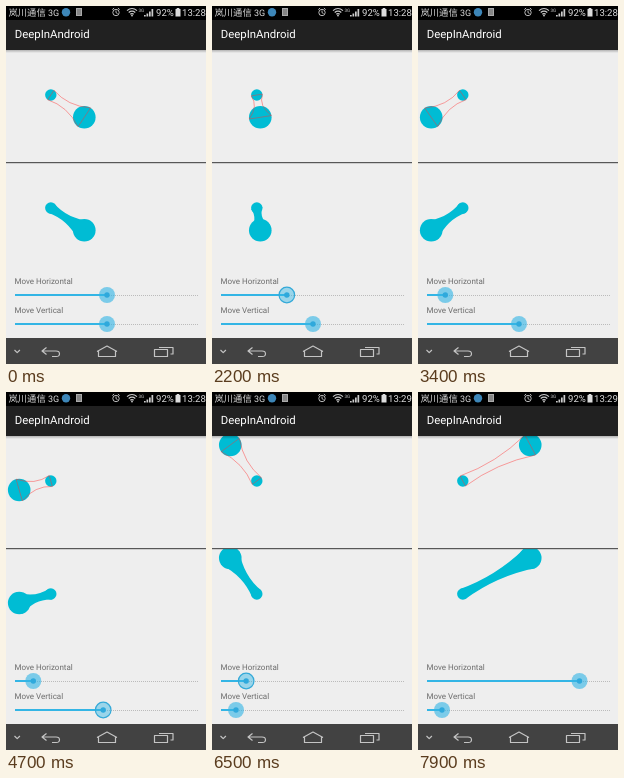
Animation of 200x358 px, one loop 8000 ms. Source, as an HTML page:

```html
<!DOCTYPE html>
<html lang="en">
<head>
<meta charset="utf-8">
<title>Bezier metaball</title>
<style>
html, body { margin: 0; width: 100%; height: 100%; overflow: hidden; background: #eee; }
svg { display: block; width: 100vw; height: 100vh; }
text { font-family: Roboto, "Noto Sans CJK SC", "Noto Sans CJK", sans-serif; text-rendering: geometricPrecision; }
.label { font-size: 8px; fill: #6c6c6c; }
.status { font-size: 9.6px; fill: #dcdcdc; }
.nav { fill: none; stroke: #c4c4c4; stroke-width: 1.2; stroke-linejoin: round; }
</style>
</head>
<body>
<svg viewBox="0 0 200 358">
  <defs>
    <clipPath id="upper"><rect y="44" width="200" height="112"/></clipPath>
    <clipPath id="lower"><rect y="157" width="200" height="112"/></clipPath>
    <linearGradient id="shade" x2="0" y2="1">
      <stop stop-color="#000" stop-opacity=".25"/>
      <stop offset="1" stop-color="#000" stop-opacity="0"/>
    </linearGradient>
  </defs>
  <rect width="200" height="358" fill="#eee"/>

  <g clip-path="url(#upper)">
    <g fill="#00bcd4">
      <circle cx="44.8" cy="89" r="5.7"/>
      <circle class="ball" r="11.3"/>
    </g>
    <path class="neck" fill="none" stroke="#f33" stroke-width=".7" stroke-opacity=".65"/>
  </g>
  <g clip-path="url(#lower)">
    <g transform="translate(0 113)" fill="#00bcd4">
      <circle cx="44.8" cy="89" r="5.7"/>
      <circle class="ball" r="11.3"/>
      <path class="neck"/>
    </g>
  </g>
  <rect y="156.1" width="200" height="1.1" fill="#484848"/>

  <text class="label" x="8.5" y="278">Move Horizontal</text>
  <text class="label" x="8.5" y="306.5">Move Vertical</text>
  <g id="sliders"></g>

  <rect y="14" width="200" height="30" fill="#212121"/>
  <rect y="44" width="200" height="3" fill="url(#shade)"/>
  <text x="8.7" y="32.3" font-size="11.4" fill="#fff">DeepInAndroid</text>

  <rect width="200" height="14" fill="#000"/>
  <text class="status" x="2.5" y="9.6" style="font-size: 9.3px">岚川通信</text>
  <text class="status" x="42" y="9.6" style="font-size: 9px">3G</text>
  <circle cx="60" cy="6.3" r="4.2" fill="#3d86b8"/>
  <path d="M70 2h6v8h-6z" fill="#aaa"/>
  <path d="M71 4h4M71 6h4M71 8h4" stroke="#444" stroke-width=".7"/>
  <g fill="none" stroke="#ccc" stroke-width=".9">
    <circle cx="110" cy="6.5" r="3.2"/>
    <path d="M110 4.5v2.2l1.5 .8M106.3 3.6l1.8-1.6M113.7 3.6l-1.8-1.6"/>
    <path d="M121 4.6q5-4.2 10 0M122.7 6.5q3.3-2.6 6.6 0M124.3 8.3q1.7-1.3 3.4 0" stroke-width="1.2"/>
  </g>
  <circle cx="126" cy="9.6" r=".9" fill="#ccc"/>
  <text x="132.5" y="5.5" font-size="4.6" fill="#ccc">3G</text>
  <path d="M138 10.5V9h1.700v1.500zM140.500 10.500V7.500h1.700v3zM143 10.500V5.500h1.700v5zM145.500 10.500V3h1.700v7.500z" fill="#ccc"/>
  <text class="status" x="150" y="9.600">92%</text>
  <path d="M169.500 3h1.200V2h2.600v1h1.200v7.500h-5z" fill="#ddd"/>
  <text class="status" id="clock" x="176" y="9.600"></text>

  <rect y="332" width="200" height="26" fill="#424242"/>
  <g class="nav">
    <path d="M8.500 344l2.700 2.700 2.700-2.700"/>
    <path d="M40.500 341.500l-4.500 3.500 4.500 3.500M36 345H50q3.500 0 3.500 2.800T50 350.500h-4"/>
    <path d="M91 345.500l10-5.500 10 5.500M92.500 345v5.500h17V345"/>
    <path d="M148.500 343.500h13v7h-13zM153 341.500h14v6.500h-2.500"/>
  </g>
</svg>
<script>
const LOOP = 8000, STEP = 100;
const LEFT = 9, RIGHT = 193;
const small = { x: 44.8, y: 89, r: 5.7 };
const BIG_R = 11.3;

// Thumb positions as [ms, x]
const hKeys = [[0, 101], [1600, 101], [1700, 102.3], [1900, 94], [2600, 49.3], [2800, 32], [2900, 27.3],
  [6400, 27.3], [6600, 41], [7100, 99], [7700, 158], [7800, 161.5]];
const vKeys = [[0, 101], [4500, 101], [4700, 97.2], [4900, 84], [5400, 33], [5600, 26], [5900, 24]];
const hHeld = t => (t >= 1700 && t < 3100) || (t >= 6400 && t < 7900);
const vHeld = t => t >= 4400 && t < 5900;

function at(keys, t) {
  const i = keys.findIndex(k => k[0] > t);
  if (i < 0) return keys[keys.length - 1][1];
  const [t0, a] = keys[i - 1], [t1, b] = keys[i];
  return a + (b - a) * (t - t0) / (t1 - t0);
}

function set(el, attrs) {
  for (const k in attrs) el.setAttribute(k, attrs[k]);
}

function make(name, attrs, parent) {
  const el = document.createElementNS("http://www.w3.org/2000/svg", name);
  set(el, attrs);
  return parent.appendChild(el);
}

function slider(y) {
  const g = make("g", {}, document.getElementById("sliders"));
  make("path", { d: `M${LEFT} ${y + .5}H${RIGHT}`, stroke: "#bbb", "stroke-width": 1, "stroke-dasharray": "1 1" }, g);
  const fill = make("path", { stroke: "#33b5e5", "stroke-width": 2 }, g);
  const halo = make("circle", { cy: y, fill: "#33b5e5" }, g);
  const dot = make("circle", { cy: y, r: 2.7, fill: "#2fa9dc" }, g);
  return (x, held) => {
    set(fill, { d: `M${LEFT} ${y}H${x}` });
    set(halo, {
      cx: x, r: held ? 7.8 : 8, "fill-opacity": held ? .45 : .62,
      stroke: held ? "#33a9d8" : "none", "stroke-width": 1.2
    });
    set(dot, { cx: x });
  };
}

// Two quadratic curves pinched toward the midpoint of the centres
function neck(x, y) {
  const dx = x - small.x, dy = y - small.y, d = Math.hypot(dx, dy) || 1;
  const nx = -dy / d, ny = dx / d;
  const mid = `${(x + small.x) / 2} ${(y + small.y) / 2}`;
  const edge = (cx, cy, r) => `${cx + nx * r} ${cy + ny * r}`;
  return `M${edge(small.x, small.y, small.r)}Q${mid} ${edge(x, y, BIG_R)}` +
    `L${edge(x, y, -BIG_R)}Q${mid} ${edge(small.x, small.y, -small.r)}Z`;
}

const hSlider = slider(289), vSlider = slider(318);
const balls = document.querySelectorAll(".ball");
const necks = document.querySelectorAll(".neck");
const clock = document.getElementById("clock");

function draw(t) {
  const h = at(hKeys, t), v = at(vKeys, t);
  // The ball keeps its starting place until each slider is first touched
  const x = t < 1700 ? 78.3 : 13.2 + (h - 27.3) * .738;
  const y = t < 4400 ? 111.3 : 53 + (v - 24) * .615;
  balls.forEach(b => set(b, { cx: x, cy: y }));
  const d = neck(x, y);
  necks.forEach(n => set(n, { d }));
  hSlider(h, hHeld(t));
  vSlider(v, vHeld(t));
  clock.textContent = t < 4900 ? "13:28" : "13:29";
}

const start = performance.now();
function tick() {
  const t = (performance.now() - start) % LOOP;
  draw(Math.floor(t / STEP) * STEP);
  requestAnimationFrame(tick);
}
tick();
</script>
</body>
</html>
```
